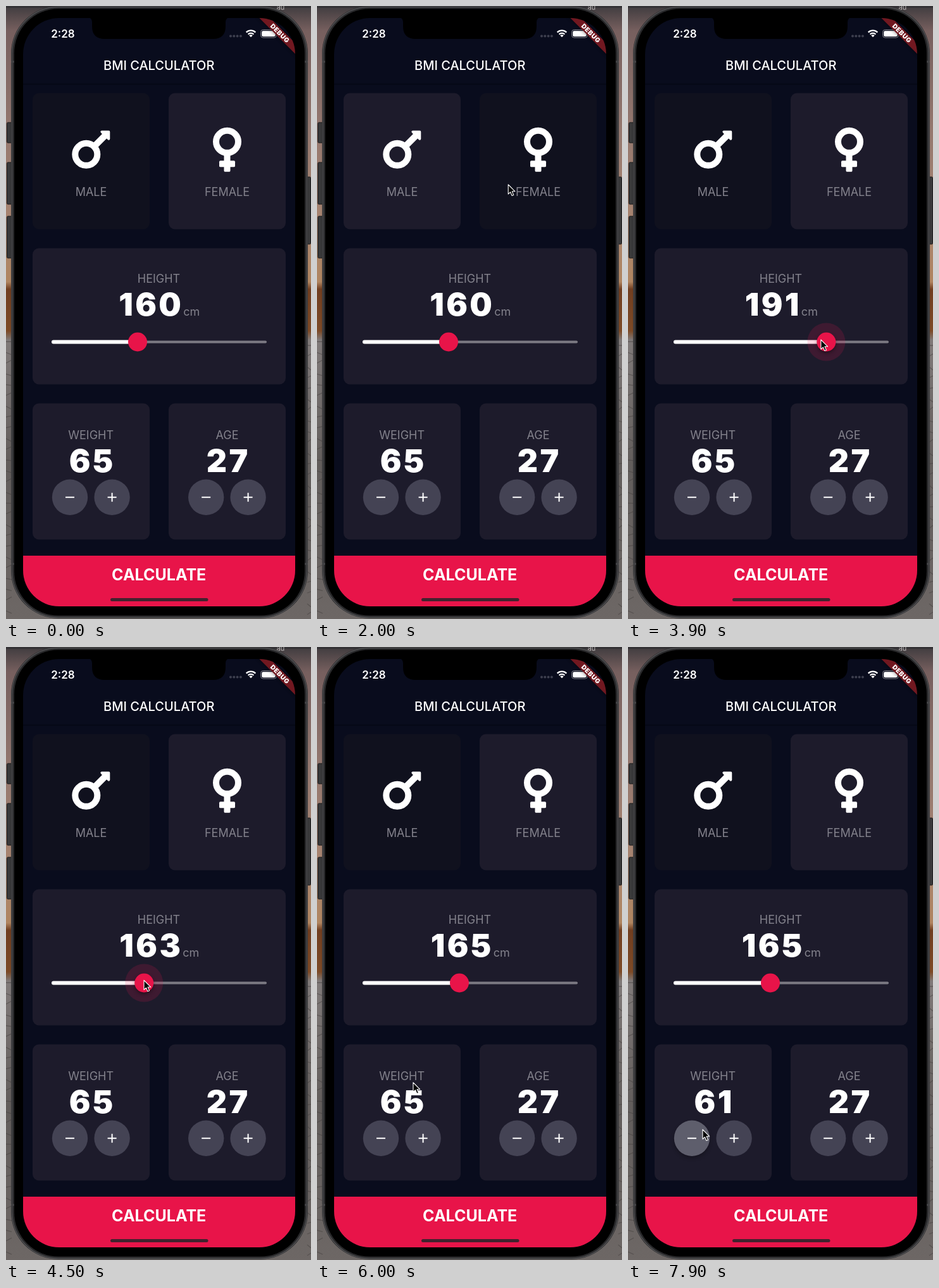
Animation of 482x968 px, one loop 8 s. Source, as an HTML page:

```html
<!DOCTYPE html>
<html lang="en">
<head>
<meta charset="utf-8">
<title>BMI Calculator</title>
<style>
  html, body { margin: 0; width: 100%; height: 100%; overflow: hidden; background: #000; }
  svg { display: block; width: 482px; height: 968px; font-family: Inter, Roboto, sans-serif; }
  text { text-anchor: middle; fill: #fff; }
  .label { font-size: 18px; fill: #83828c; }
  .num { font-size: 50px; font-weight: 900; letter-spacing: 3.4px; }
</style>
</head>
<body>
<svg viewBox="0 0 482 968">
  <defs>
    <linearGradient id="sky" x2="0" y2="1">
      <stop offset="0" stop-color="#403c3f"/>
      <stop offset=".04" stop-color="#765f5e"/>
      <stop offset=".2" stop-color="#94786f"/>
      <stop offset=".36" stop-color="#a98570"/>
      <stop offset=".45" stop-color="#b08560"/>
      <stop offset=".462" stop-color="#713e20"/>
      <stop offset=".53" stop-color="#7d4a26"/>
      <stop offset=".545" stop-color="#807a79"/>
      <stop offset=".75" stop-color="#625d5b"/>
      <stop offset="1" stop-color="#6d6765"/>
    </linearGradient>
    <clipPath id="screen"><rect x="27" y="19" width="430" height="929" rx="57"/></clipPath>
    <filter id="soft" x="-50%" y="-50%" width="200%" height="200%"><feGaussianBlur stdDeviation="3"/></filter>
  </defs>

  <rect width="482" height="968" fill="url(#sky)"/>
  <g id="rocks" stroke="#45403f" stroke-width="1.3" opacity=".5"></g>
  <rect width="482" height="3" fill="#343235"/>
  <text x="434" y="6" font-size="11" style="fill:#b9b5b5">au</text>

  <g fill="#39393a" stroke="#1a1a1b">
    <rect x="1.5" y="184" width="9" height="32" rx="1.5"/>
    <rect x="1.5" y="247" width="9" height="66" rx="1.5"/>
    <rect x="1.5" y="332" width="9" height="66" rx="1.5"/>
    <rect x="473" y="270" width="8.5" height="106" rx="1.5"/>
  </g>
  <rect x="8" y="0" width="469" height="967" rx="75" fill="#29292b"/>
  <rect x="9.5" y="1.5" width="466" height="964" rx="73.500" fill="none" stroke="#505052" stroke-width="1.4"/>
  <path d="M8 88h5M472 88h5M8 881h5M472 881h5" stroke="#434345" stroke-width="3"/>
  <rect x="13" y="4.5" width="459" height="958" rx="70" fill="#000"/>

  <g clip-path="url(#screen)">
    <rect x="27" y="19" width="430" height="929" fill="#090c1d"/>
    <path d="M27 123.5h430" stroke="#060814" stroke-width="2" opacity=".7"/>
    <path d="M128 18q8 0 8 8v6q0 20 20 20h171q20 0 20-20v-6q0-8 8-8z" fill="#000"/>

    <text x="90" y="49.6" font-size="17" font-weight="600">2:28</text>
    <g fill="#3d3f4e">
      <circle cx="355" cy="47.5" r="2"/><circle cx="360.3" cy="47.5" r="2"/>
      <circle cx="365.6" cy="47.5" r="2"/><circle cx="370.9" cy="47.5" r="2"/>
    </g>
    <path d="M379.7 41.6a10.4 10.4 0 0 1 14.6 0M382.6 44.7a6.2 6.2 0 0 1 8.8 0" fill="none" stroke="#fff" stroke-width="2.3"/>
    <path d="M384.3 46.5a3.9 3.9 0 0 1 5.4 0l-2.7 2.8z" fill="#fff"/>
    <rect x="402.5" y="37.5" width="25" height="12.5" rx="3.8" fill="none" stroke="#85858d"/>
    <rect x="404.2" y="39.2" width="21.6" height="9.1" rx="2.2" fill="#fff"/>

    <text x="241.7" y="101.2" font-size="20" font-weight="500">BMI CALCULATOR</text>

    <g fill="#1d1b2b">
      <rect id="male" x="42" y="137.5" width="185" height="215" rx="10"/>
      <rect id="female" x="257" y="137.5" width="185" height="215" rx="10"/>
      <rect x="42" y="382.5" width="400" height="215" rx="10"/>
      <rect x="42" y="627.5" width="185" height="215" rx="10"/>
      <rect x="257" y="627.5" width="185" height="215" rx="10"/>
    </g>

    <g transform="translate(0 -.7)">
      <g fill="none" stroke="#fff" stroke-width="10">
        <circle cx="126.8" cy="235" r="17.5"/>
        <path d="M139 222.800L158 203.8"/>
        <path d="M151.3 199.4h11.1v11.1z" fill="#fff" stroke-width="3.8" stroke-linejoin="round"/>
        <circle cx="349.5" cy="215" r="17.5"/>
      </g>
      <g fill="#fff">
        <rect x="344.5" y="235" width="10" height="27.5" rx="1.9"/>
        <rect x="337" y="245" width="25" height="10" rx="1.9"/>
      </g>
    </g>
    <text class="label" x="134.5" y="299.5">MALE</text>
    <text class="label" x="349.5" y="299.5">FEMALE</text>

    <text class="label" x="241.5" y="436.5">HEIGHT</text>
    <text x="242.3" y="489"><tspan id="height" class="num">160</tspan><tspan class="label">cm</tspan></text>
    <rect x="72" y="528.5" width="340" height="4" rx="2" fill="#7c7a83"/>
    <rect id="track" x="72" y="527.5" height="6" rx="3" fill="#fff"/>
    <g id="thumb">
      <circle id="halo" fill="#eb1555" opacity=".16"/>
      <circle id="shade" cy="3" r="14" fill="#000" opacity=".4" filter="url(#soft)"/>
      <circle r="15" fill="#e81449"/>
    </g>

    <text class="label" x="134.2" y="683.5">WEIGHT</text>
    <text id="weight" class="num" x="136.2" y="736">65</text>
    <text class="label" x="349.5" y="683.5">AGE</text>
    <text class="num" x="351.2" y="736">27</text>
    <circle id="lift" cx="101" cy="779" r="28" fill="#000" filter="url(#soft)"/>
    <g fill="#444354">
      <circle cx="101" cy="775.8" r="28.2"/><circle cx="167.6" cy="775.8" r="28.2"/>
      <circle cx="316.2" cy="775.8" r="28.2"/><circle cx="382.6" cy="775.8" r="28.2"/>
    </g>
    <circle id="glow" cx="101" cy="775.8" r="28.2" fill="#fff"/>
    <path d="M94 775.8h14M160.6 775.8h14M167.6 768.8v14M309.2 775.8h14M375.6 775.8h14M382.6 768.8v14" stroke="#fff" stroke-width="2"/>

    <rect x="27" y="868" width="430" height="80" fill="#e81449"/>
    <text x="241.7" y="906.800" font-size="25" font-weight="700">CALCULATE</text>
    <rect x="165" y="935" width="154.5" height="5" rx="2.5" fill="#42222e"/>

    <g transform="translate(457 19) rotate(45)">
      <rect x="-60" y="28" width="120" height="12" fill="#000" opacity=".5" filter="url(#soft)"/>
      <rect x="-60" y="28" width="120" height="12" fill="#711820"/>
      <text y="37.7" font-size="10.2" font-weight="900" letter-spacing=".5">DEBUG</text>
    </g>
  </g>

  <path id="cursor" d="M0 0V15l3.4-3.2 2.5 5.7 2.6-1.1-2.4-5.6h4.7z" fill="#000" stroke="#fff" stroke-width="1.1" stroke-linejoin="round"/>
</svg>
<script>
const LOOP = 8000;
const $ = id => document.getElementById(id);
const set = (id, attrs) => { for (const k in attrs) $(id).setAttribute(k, attrs[k]); };

// Smooth monotone curve through [time, value] points.
function curve(pts) {
  const slope = i => (pts[i + 1][1] - pts[i][1]) / (pts[i + 1][0] - pts[i][0]);
  const tangent = i => {
    if (i === 0 || i === pts.length - 1) return 0;
    const a = slope(i - 1), b = slope(i);
    return a * b <= 0 ? 0 : 2 * a * b / (a + b);
  };
  return t => {
    if (t <= pts[0][0]) return pts[0][1];
    const i = pts.findIndex(p => p[0] > t) - 1;
    if (i < 0) return pts[pts.length - 1][1];
    const [t0, a] = pts[i], [t1, b] = pts[i + 1], d = t1 - t0, u = (t - t0) / d;
    const s = u * u * (3 - 2 * u);
    return a + (b - a) * s + d * u * (1 - u) * (tangent(i) * (1 - u) - tangent(i + 1) * u);
  };
}

const cursorX = curve([[300, -14], [1000, 134], [1400, 134], [2000, 302], [2200, 335], [2400, 335],
  [2900, 207], [2980, 208], [3100, 230], [3500, 345], [3900, 305], [4500, 218], [5000, 226],
  [5500, 226], [6300, 118]]);
const cursorY = curve([[300, 330], [1000, 250], [1400, 250], [2000, 282], [2200, 270], [2400, 270],
  [2900, 530], [3100, 530], [3900, 527], [5000, 526], [5500, 526], [6300, 762]]);
const heightAt = curve([[2970, 160], [3100, 163], [3540, 201], [3900, 191], [4530, 163], [5030, 165]]);
const haloAt = curve([[3110, 0], [3220, 1], [5400, 1], [5500, 0]]);

const FIRST_TAP = 6880, TAP_GAP = 250, TAP_HOLD = 150, TAPS = 4;

function taps(t) {
  const n = Math.floor((t - FIRST_TAP - TAP_HOLD) / TAP_GAP) + 1;
  return Math.max(0, Math.min(TAPS, n));
}

function pressure(t) {
  if (t < FIRST_TAP) return 0;
  const age = (t - FIRST_TAP) % TAP_GAP;
  const floor = t < FIRST_TAP + TAP_HOLD ? 0 : .12;
  return floor + (.22 - floor) * Math.min(1, age / 100);
}

function draw(t) {
  const male = t >= 1100 && t < 2250;
  set("male", { fill: male ? "#1d1b2b" : "#10111e" });
  set("female", { fill: male ? "#10111e" : "#1d1b2b" });

  const height = Math.round(heightAt(t)), x = 72 + (height - 120) * 3.4;
  const halo = haloAt(t);
  $("height").textContent = height;
  set("track", { width: x - 72 });
  set("thumb", { transform: `translate(${x} 530.5)` });
  set("halo", { r: 30 * halo });
  set("shade", { opacity: .5 * halo });

  const press = pressure(t);
  $("weight").textContent = 65 - taps(t);
  set("glow", { opacity: press });
  set("lift", { opacity: press * 2 });

  set("cursor", {
    transform: `translate(${cursorX(t)} ${cursorY(t)})`,
    visibility: t < 300 ? "hidden" : "visible"
  });
}

// Cracks in the rock beside the phone.
let cracks = "";
for (let i = 0; i < 26; i++) {
  const y = 530 + i * 17, dy = 5 * Math.sin(i * 2.3);
  cracks += `<path d="M0 ${y}l9 ${dy}M476 ${y + 6}l6 ${-dy}"/>`;
}
$("rocks").innerHTML = cracks;

function tick(now) {
  draw(now % LOOP);
  requestAnimationFrame(tick);
}
draw(0);
requestAnimationFrame(tick);
</script>
</body>
</html>
```
